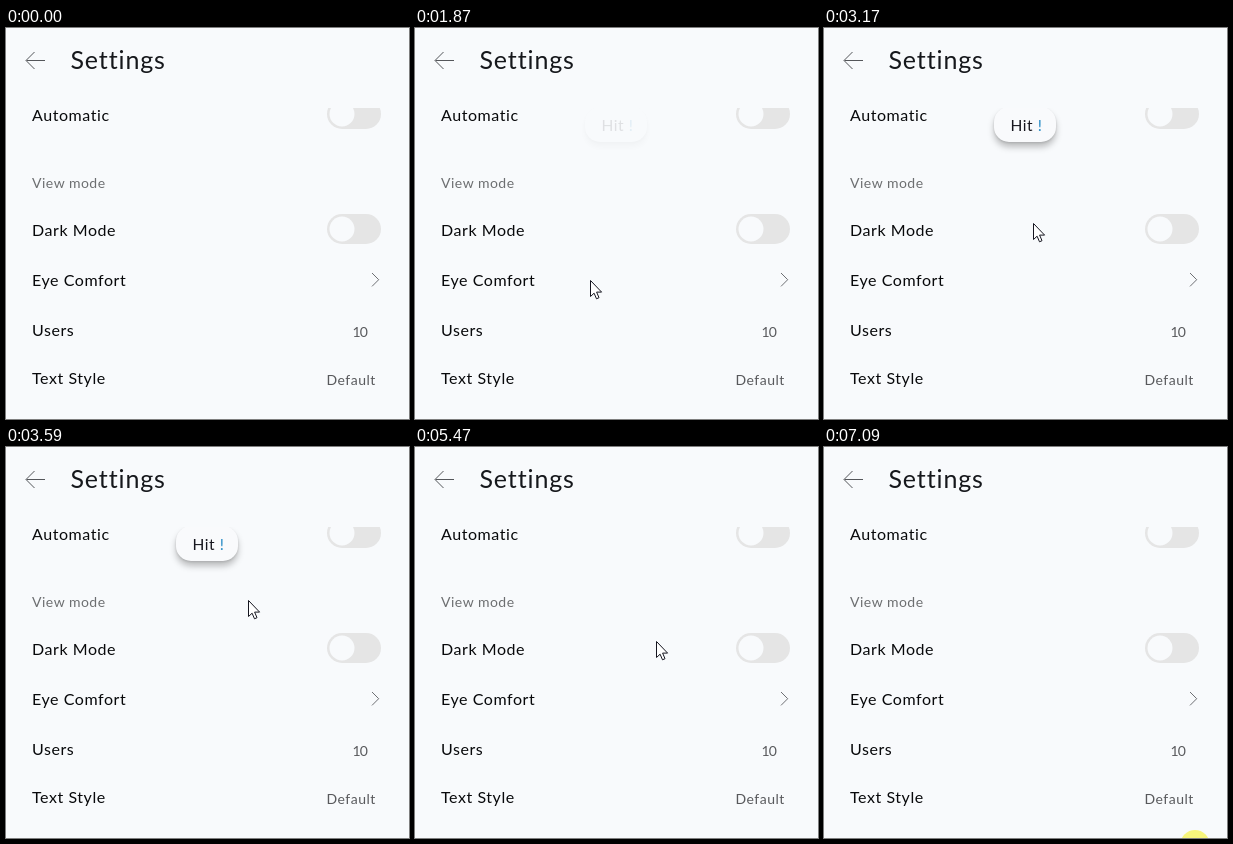
These frames come from a looping animation (403 by 391 pixels, 7.18 s). An HTML page:

```html
<!DOCTYPE html>
<html lang="en">
<head>
<meta charset="utf-8">
<title>Settings</title>
<style>
  html, body { margin: 0; width: 100%; height: 100%; overflow: hidden; background: #f8fafc; }
  svg { display: block; width: 100%; height: 100%; }
  text { font-family: Quicksand, Lato, "Open Sans", sans-serif; letter-spacing: .035em; }
  .title { font-size: 25px; fill: #16181c; }
  .row { font-size: 16px; fill: #08090b; }
  .note { font-size: 14px; fill: #6c6e70; }
  .value { font-size: 14px; fill: #58595c; }
  .line { fill: none; stroke: #54565a; }
  .pill { filter: drop-shadow(0 1px 1px rgba(0,0,0,.12)) drop-shadow(0 5px 3px rgba(0,0,0,.24)); }
</style>
</head>
<body>
<svg viewBox="0 0 403 391">
  <defs>
    <clipPath id="list"><rect y="80" width="403" height="311"/></clipPath>
    <g id="toggle">
      <rect width="54" height="30" rx="15" fill="#e5e5e5"/>
      <circle cx="15" cy="15" r="12.5" fill="#f8fafc"/>
    </g>
  </defs>
  <rect width="403" height="391" fill="#f8fafc"/>

  <path class="line" d="M39 32.5H20.5M28.5 24L20 32.5L28.5 41"/>
  <text class="title" x="64.5" y="41">Settings</text>

  <g clip-path="url(#list)">
    <text class="row" x="26" y="93">Automatic</text>
    <use href="#toggle" x="321" y="71"/>
    <text class="note" x="26" y="160">View mode</text>
    <text class="row" x="26" y="208">Dark Mode</text>
    <use href="#toggle" x="321" y="186"/>
    <text class="row" x="26" y="258">Eye Comfort</text>
    <path class="line" d="M366 245L372.7 251.7L366 258.4" stroke-width=".85"/>
    <text class="row" x="26" y="308">Users</text>
    <text class="value" x="346.5" y="309" style="letter-spacing:-.06em">10</text>
    <text class="row" x="26" y="356">Text Style</text>
    <text class="value" x="320.5" y="357">Default</text>

    <g id="hit">
      <rect class="pill" x="170" y="79" width="62" height="35" rx="15" fill="#f9fafc"/>
      <text x="186.5" y="103" font-size="15.5" fill="#15151d">Hit <tspan fill="#2389c4">!</tspan></text>
    </g>
  </g>

  <circle id="spot" cx="371" cy="397.6" r="14.6" fill="#f7f57c"/>
  <path id="cursor" d="M.5 .5V16.5L4.1 13.2L6.5 18.8L9 17.7L6.6 12.1H11.6Z"
        fill="#fff" stroke="#15151f" stroke-linejoin="round"/>
</svg>
<script>
const LOOP = 7180;
const [hit, spot, cursor] = ["hit", "spot", "cursor"].map(id => document.getElementById(id));

// Each move bends from the last resting point past "via" to "to"; power sets the ease-out.
const origin = [246, 383];
const moves = [
  { start: 870, end: 1430, via: [204, 320], to: [175, 252], power: 1.43 },
  { start: 3040, end: 3360, via: [208, 197], to: [236, 145], power: 1.43 },
  { start: 3460, end: 4120, via: [250, 157], to: [241, 191], power: 1.43 },
  { start: 5440, end: 6060, via: [246, 222], to: [242, 254], power: 1 },
  { start: 6580, end: 6900, via: [299, 323], to: [356, 392], power: 1 }
];

const ramp = (t, from, to) => Math.min(1, Math.max(0, (t - from) / (to - from)));

function bend(a, b, c, k) {
  const j = 1 - k;
  return a.map((v, n) => Math.round(j * j * v + 2 * j * k * b[n] + k * k * c[n]));
}

function pointAt(t) {
  let point = origin;
  for (const { start, end, via, to, power } of moves) {
    if (t < start) break;
    point = bend(point, via, to, 1 - (1 - ramp(t, start, end)) ** power);
  }
  return point;
}

function show(node, on) {
  node.setAttribute("visibility", on ? "visible" : "hidden");
}

function draw(t) {
  show(cursor, t >= 870 && t < 6900);
  cursor.setAttribute("transform", `translate(${pointAt(t)})`);
  hit.setAttribute("opacity", ramp(t, 1820, 2300) * (1 - ramp(t, 4970, 5150)));
  show(spot, t >= 7090);
}

const start = performance.now();
function tick() {
  draw((performance.now() - start) % LOOP);
  requestAnimationFrame(tick);
}
tick();
</script>
</body>
</html>
```
